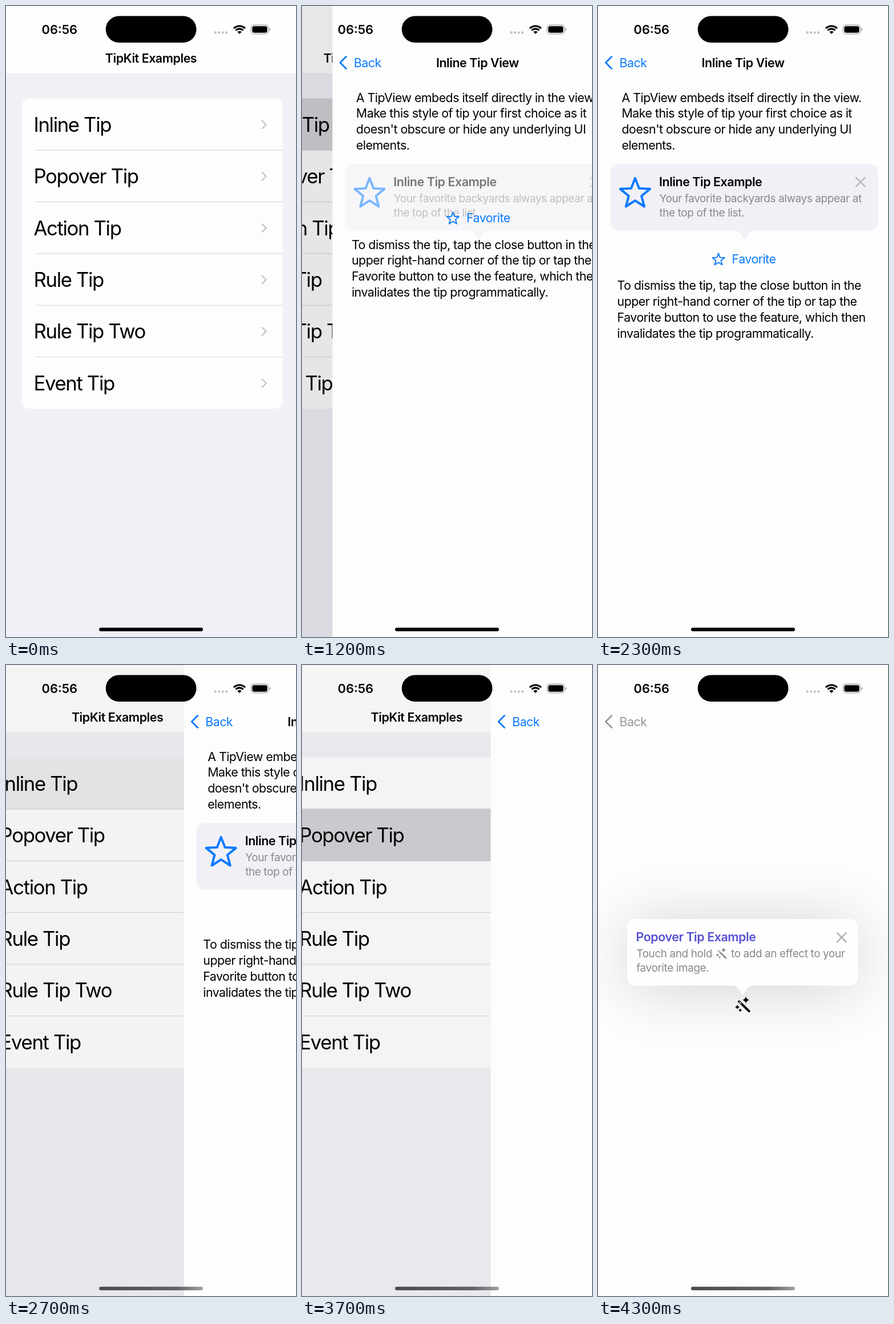
Recreate the animation shown at these times as an HTML page. Size 508x1103 px, loop 5.4 s.

```html
<!DOCTYPE html>
<html lang="en">
<head>
<meta charset="utf-8">
<title>Tip examples</title>
<style>
  html, body { margin: 0; width: 100%; height: 100%; overflow: hidden; background: #fdfdfd; }
  svg { display: block; width: 100vw; height: 100vh; }
  text { font: 400 21.4px Inter, Roboto, sans-serif; font-optical-sizing: none; letter-spacing: -.0245em; }
  .row { font-size: 34.7px; letter-spacing: -.039em; }
  .bold { font-weight: 600; letter-spacing: -.02em; }
  .note { font-size: 18.9px; letter-spacing: -.0195em; fill: #88888c; }
  .clock { font-weight: 600; font-size: 21.8px; letter-spacing: 0; }
  .mid { text-anchor: middle; }
  .line { fill: none; stroke-linecap: round; stroke-linejoin: round; }
  .shadow { filter: blur(54px); }
</style>
</head>
<body>
<svg viewBox="0 0 508 1103" preserveAspectRatio="none">
  <defs>
    <clipPath id="cardClip"><rect x="28" y="161.5" width="457" height="542.5" rx="13"/></clipPath>
    <linearGradient id="worn">
      <stop offset="0" stop-color="#4c4c4e"/>
      <stop offset=".75" stop-color="#626264"/>
      <stop offset="1" stop-color="#a0a0a2"/>
    </linearGradient>
    <path id="spark" d="M0-1Q.2-.2 1 0Q.2 .2 0 1Q-.2 .2-1 0Q-.2-.2 0-1Z"/>
    <g id="wand">
      <path class="line" d="M-6.4-6.2L11.2 10.6" stroke="currentColor" stroke-width="4"/>
      <path class="line" d="M-5.6-5.4L-3-2.9" stroke="#fdfdfd" stroke-width="1.5"/>
      <g fill="currentColor">
        <use href="#spark" transform="translate(5.6 -9)scale(6)"/>
        <use href="#spark" transform="translate(-9.4 3.4)scale(4.2)"/>
        <use href="#spark" transform="translate(-4.4 9)scale(3.2)"/>
      </g>
    </g>
  </defs>

  <g id="list">
    <rect width="508" height="1103" fill="#f0f0f6"/>
    <rect width="508" height="117.5" fill="#fefefe"/>
    <text class="bold mid" x="254" y="98.8">TipKit Examples</text>
    <rect x="28" y="161.5" width="457" height="542.5" rx="13" fill="#fdfdfd"/>
    <g id="rows" clip-path="url(#cardClip)"></g>
  </g>
  <rect id="dim" width="508" height="1103"/>

  <g id="inlinePage">
    <rect width="508" height="1103" fill="#fdfdfd"/>
    <g class="back"></g>
    <text class="bold mid" x="254" y="106.8">Inline Tip View</text>
    <g id="intro"></g>
    <g id="tip">
      <rect x="22" y="276" width="468.5" height="116.5" rx="14" fill="#f1f0f7"/>
      <path d="M240 392Q246 393 250 399L253.5 405.5Q256.5 410 259.5 405.5L263 399Q267 393 273 392Z" fill="#f1f0f7"/>
      <path id="bigStar" class="line" stroke="#0a7aff" stroke-width="4"/>
      <text class="bold" x="107" y="314.7">Inline Tip Example</text>
      <text class="note" x="107.5" y="342.6">Your favorite backyards always appear at</text>
      <text class="note" x="107.5" y="367.6">the top of the list.</text>
      <path class="line" d="M452 300L467.5 315.5M467.5 300L452 315.5" stroke="#bdbdc1" stroke-width="2.6"/>
    </g>
    <g id="lower">
      <path id="smallStar" class="line" stroke="#0a7aff" stroke-width="1.9"/>
      <text x="234.6" y="450.2" fill="#0a7aff">Favorite</text>
      <g id="outro"></g>
    </g>
  </g>

  <g id="popoverPage">
    <rect width="508" height="1103" fill="#fdfdfd"/>
    <g class="back"></g>
    <g id="popover">
      <rect class="shadow" x="51" y="447" width="404" height="122" rx="14" opacity=".16"/>
      <rect x="51" y="444" width="404.5" height="116.5" rx="14" fill="#fefefe"/>
      <path d="M236 560Q243 561 247 567L250.5 573Q253.5 577.5 256.5 573L260 567Q264 561 271 560Z" fill="#fefefe"/>
      <text class="bold" x="66.5" y="482.7" fill="#5550d3">Popover Tip Example</text>
      <text class="note" x="67.3" y="510.7">Touch and hold</text>
      <use href="#wand" transform="translate(216 504.5)scale(.7)" color="#88888c"/>
      <text class="note" x="233" y="510.7">to add an effect to your</text>
      <text class="note" x="67.3" y="535.7">favorite image.</text>
      <path class="line" d="M419 468.5L434.5 484M434.5 468.5L419 484" stroke="#b4b4b8" stroke-width="2.6"/>
    </g>
    <use href="#wand" transform="translate(253.5 594.5)" color="#000"/>
  </g>

  <g id="status">
    <text class="clock" x="62.5" y="49">06:56</text>
    <rect x="174.7" y="17.4" width="158.8" height="46.7" rx="23.3"/>
    <path class="line" d="M366.5 46.5h.01m6.6 0h.01m6.6 0h.01m6.6 0h.01" stroke="#c2c2c4" stroke-width="4.3"/>
    <g fill="none" stroke="#000" stroke-width="3.2">
      <path d="M399.1 39.1a14 14 0 0 1 19.8 0"/>
      <path d="M402.6 42.6a9 9 0 0 1 12.8 0"/>
    </g>
    <path d="M409 49l-3.7-3.7a5.2 5.2 0 0 1 7.4 0Z"/>
    <rect x="429.2" y="33.2" width="30.6" height="15.6" rx="5" fill="none" stroke="#a2a2a4" stroke-width="1.2"/>
    <rect x="431.3" y="35.3" width="26.4" height="11.4" rx="3.4"/>
    <path d="M461.3 38.5q2.2 .8 2.2 2.5t-2.2 2.5Z" fill="#a2a2a4"/>
    <rect id="home" x="163" y="1086.7" width="182" height="6.2" rx="3.1"/>
  </g>
</svg>
<script>
const LOOP = 5400, STEP = 100, WIDTH = 508, ROW = 90.4, TOP = 161.5;
const PUSH_INLINE = 936, TIP_IN = 1044, POP = 2557, PUSH_POPOVER = 3615, POPOVER_IN = 4090;
const BLUE = '#0a7aff';
const $ = id => document.getElementById(id);

const paragraph = (x, y, lines) => lines.map((line, i) =>
  `<text x="${x}" y="${y + 27.8 * i}">${line}</text>`).join('');

function starPath(cx, cy, radius) {
  const points = Array.from({ length: 10 }, (_, i) => {
    const r = i % 2 ? radius * 0.43 : radius, a = i * Math.PI / 5;
    return `${cx + r * Math.sin(a)} ${cy - r * Math.cos(a)}`;
  });
  return `M${points.join('L')}Z`;
}

const labels = ['Inline Tip', 'Popover Tip', 'Action Tip', 'Rule Tip', 'Rule Tip Two', 'Event Tip'];
const perRow = draw => labels.map((label, i) => draw(TOP + ROW * i, label)).join('');
$('rows').innerHTML =
  perRow(y => y > TOP ? `<path d="M51 ${y}H485" stroke="#dcdcde" stroke-width="1.2"/>` : '') +
  `<rect id="pressed" x="28" width="457" height="${ROW + 1.2}" fill="#d1d1d6"/>` +
  perRow((y, label) => `<text class="row" x="48.5" y="${y + 58.2}">${label}</text>
    <path class="line" d="M448.7 ${y + 39}l7 6.8l-7 6.8" stroke="#c2c2c5" stroke-width="2.2"/>`);

$('intro').innerHTML = paragraph(41.5, 167.6, [
  'A TipView embeds itself directly in the view.',
  'Make this style of tip your first choice as it',
  "doesn't obscure or hide any underlying UI",
  'elements.']);
$('outro').innerHTML = paragraph(33.6, 496.4, [
  'To dismiss the tip, tap the close button in the',
  'upper right-hand corner of the tip or tap the',
  'Favorite button to use the feature, which then',
  'invalidates the tip programmatically.']);
$('bigStar').setAttribute('d', starPath(65, 328.3, 27.4));
$('smallStar').setAttribute('d', starPath(211, 443.5, 11.2));

const backs = document.querySelectorAll('.back');
for (const back of backs) {
  back.innerHTML = `<path class="line" d="M24 88.5L13.5 99L24 109.5" stroke="currentColor" stroke-width="2.8"/>
    <text x="37.5" y="106.8" fill="currentColor">Back</text>`;
  back.style.color = BLUE;
}

// Critically damped spring from 0 to 1.
function spring(ms, rate) {
  const x = Math.max(0, ms) / 1000 * rate, rest = (1 + x) * Math.exp(-x);
  return rest < 0.004 ? 1 : 1 - rest;
}
const slide = ms => spring(ms, 14.5);
const shiftTo = (id, x, y = 0) => $(id).setAttribute('transform', `translate(${x} ${y})`);

function render(t) {
  const inline = slide(t - PUSH_INLINE) - slide(t - POP);
  const popover = slide(t - PUSH_POPOVER);
  const cover = Math.max(inline, popover);
  const second = t >= PUSH_POPOVER;

  shiftTo('list', -0.3 * WIDTH * cover);
  $('dim').setAttribute('opacity', 0.1 * cover);
  $('pressed').setAttribute('y', TOP - 0.6 + (second ? ROW : 0));
  $('pressed').setAttribute('opacity', t >= POP && !second ? inline : cover > 0 ? 1 : 0);
  shiftTo('inlinePage', WIDTH * (1 - inline));
  shiftTo('popoverPage', WIDTH * (1 - popover));

  const tip = spring(t - TIP_IN, 11.4);
  $('tip').setAttribute('opacity', tip);
  shiftTo('lower', 0, -153 * (1 - tip));

  const shown = Math.min(1, Math.max(0, (t - POPOVER_IN) / 130));
  $('popover').setAttribute('opacity', shown);
  backs[1].style.color = shown > 0 ? '#98989b' : BLUE;
  $('home').setAttribute('fill', t >= POP ? 'url(#worn)' : '#000');
}

function frame() {
  render(Math.floor(performance.now() % LOOP / STEP) * STEP);
  requestAnimationFrame(frame);
}
frame();
</script>
</body>
</html>
```
